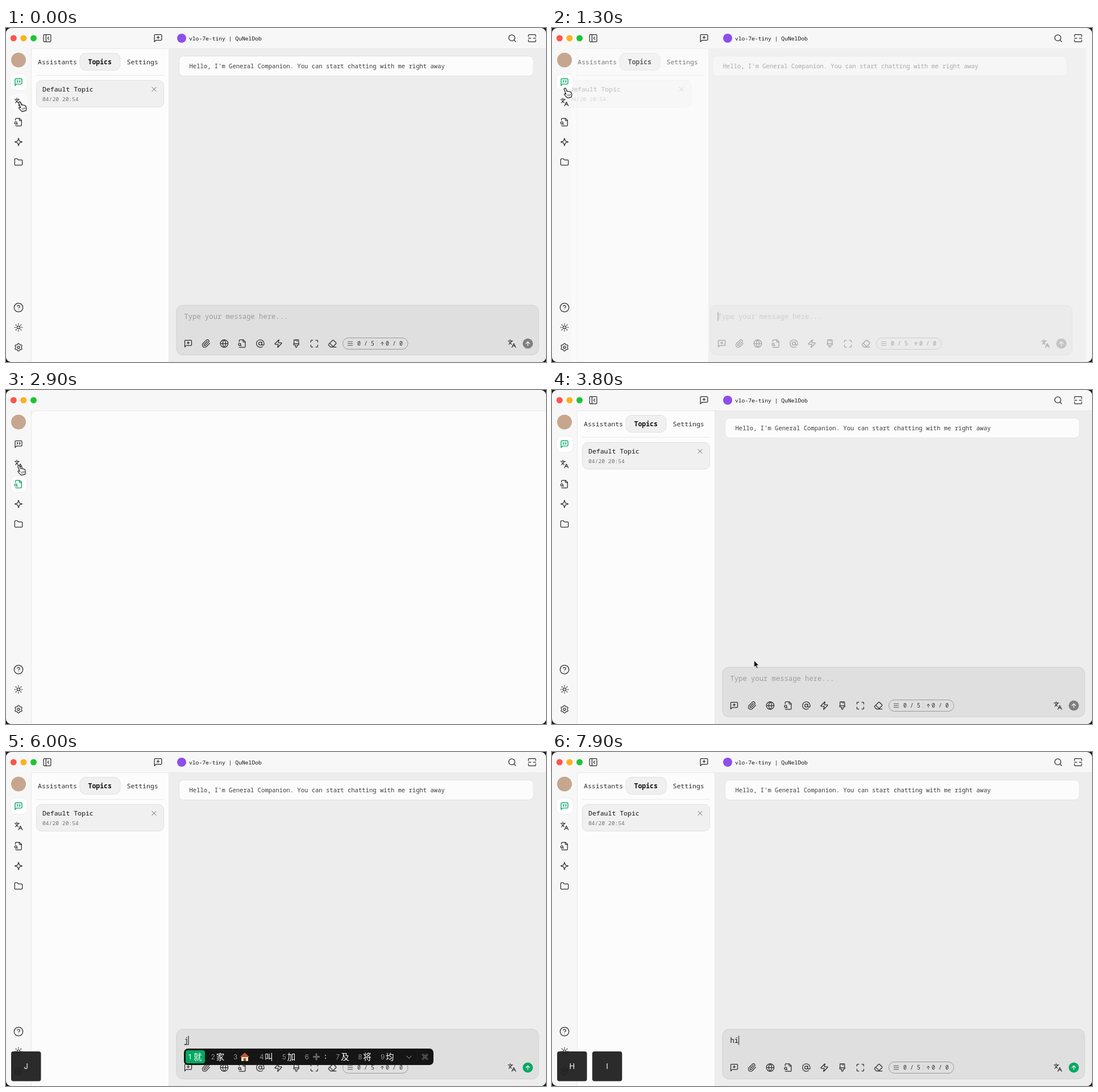
An HTML page that plays this animation: 950 by 589 pixels, repeating every 8000 ms.

```html
<!DOCTYPE html>
<html lang="en">
<head>
<meta charset="utf-8">
<title>Chat and translation demo</title>
<style>
html, body { margin: 0; width: 100%; height: 100%; overflow: hidden; background: #1d1b18; }
svg { display: block; width: 100vw; height: 100vh; }
text { font-family: "Noto Sans Mono", "DejaVu Sans Mono", monospace; white-space: pre; }
.ui { font-family: Inter, "Noto Sans CJK SC", "Noto Sans CJK", sans-serif; }
.icon { fill: none; stroke-linecap: round; stroke-linejoin: round; }
.slide { animation: slide 8s infinite linear; }
.pointer { animation: point 8s infinite linear; }
.caret { animation: advance 8s infinite step-end; }
@keyframes slide {
  0%, 14.99%, 18.75%, 42.49%, 46.25%, 100% { transform: none; opacity: 1; }
  15%, 42.5% { transform: translateX(-30px); opacity: 0; animation-timing-function: cubic-bezier(.1, .4, .5, 1); }
}
@keyframes point {
  0%, 7.5% { transform: translate(24px, 131px); }
  8.75% { transform: translate(24px, 115px); }
  12.5%, 14.5% { transform: translate(23px, 102px); }
  16.25% { transform: translate(23px, 107px); }
  20% { transform: translate(23px, 112px); }
  23%, 26% { transform: translate(23px, 130px); }
  29.5%, 33% { transform: translate(22.5px, 165px); }
  40%, 41.5% { transform: translate(22.5px, 98px); }
  42.5% { transform: translate(60px, 140px); animation-timing-function: ease-out; }
  47.5%, 48.5% { transform: translate(355.5px, 477px); }
  52.5% { transform: translate(358px, 505px); }
  62.5%, 100% { transform: translate(362px, 511px); }
}
@keyframes advance {
  0%, 78.75% { transform: none; }
  70%, 92.5% { transform: translateX(7px); }
  95%, 100% { transform: translateX(14.5px); }
}
</style>
</head>
<body>
<script>
const LOOP = 8000;

// Time windows in ms during which each part is visible.
const windows = {
  chat: [[0, 100], [1200, 2000], [3400, LOOP]],
  translate: [[100, 1200], [2000, 2500]],
  files: [[2500, 3400]],
  hover: [[0, 100]],
  hand: [[0, 3400]],
  arrow: [[3400, 4200]],
  beam: [[4200, 5500]],
  click: [[1100, 1200], [1900, 2000], [2400, 2500], [3300, 3400]],
  empty: [[0, 5600], [6300, 7400]],
  filled: [[5600, 6300], [7400, LOOP]],
  ime: [[5600, 6300]],
  textH: [[7400, 7600]],
  textHi: [[7600, LOOP]],
  keyJ: [[5500, 6700]],
  keyH: [[7100, LOOP]],
  keyI: [[7500, LOOP]],
  blink: [[1200, 1700], [3400, 3700], [4200, 4700], [5200, 6800], [7300, LOOP]]
};

function windowCss([name, spans]) {
  const stops = new Map([[0, 0]]);
  for (const [from, to] of spans) {
    stops.set(from, 1);
    if (to < LOOP) stops.set(to, 0);
  }
  const frames = [...stops].map(([ms, on]) => `${ms / LOOP * 100}% { opacity: ${on}; }`);
  return `@keyframes ${name} { ${frames.join(" ")} 100% { opacity: ${[...stops.values()].pop()}; } }
    .${name} { animation: ${name} ${LOOP}ms infinite step-end; }`;
}
document.head.appendChild(document.createElement("style")).textContent =
  Object.entries(windows).map(windowCss).join("\n");

const disc = (x, y, r) => `M${x - r} ${y}a${r} ${r} 0 1 0 ${2 * r} 0a${r} ${r} 0 1 0 ${-2 * r} 0`;
const gear = () => "M" + Array.from({ length: 72 }, (_, i) => {
  const a = i * Math.PI / 36, r = 8.8 - 1.3 * Math.cos(6 * a);
  return `${(12 + r * Math.cos(a)).toFixed(2)} ${(12 + r * Math.sin(a)).toFixed(2)}`;
}).join("L") + "z" + disc(12, 12, 3);

const bubble = "M21 15a2 2 0 0 1-2 2H7l-4 4V5a2 2 0 0 1 2-2h14a2 2 0 0 1 2 2z";
const icons = {
  quote: bubble + "M8 12a2 2 0 0 0 2-2V8H8M14 12a2 2 0 0 0 2-2V8h-2",
  add: bubble + "M12 7v6M9 10h6",
  languages: "m5 8 6 6M4 14l6-6 2-3M2 5h12M7 2h1M22 22l-5-10-5 10M14 18h6",
  fileSearch: "M14 2v4a2 2 0 0 0 2 2h4M4.3 21a2 2 0 0 0 1.7 1H18a2 2 0 0 0 2-2V7l-5-5H6a2 2 0 0 0-2 2v3M9 18l-1.5-1.5" + disc(5, 14, 3),
  sparkle: "M12 2l2 6.5A2 2 0 0 0 15.5 10L22 12l-6.5 2A2 2 0 0 0 14 15.5L12 22l-2-6.5A2 2 0 0 0 8.5 14L2 12l6.5-2A2 2 0 0 0 10 8.5z",
  folder: "M20 20a2 2 0 0 0 2-2V8a2 2 0 0 0-2-2h-7.9a2 2 0 0 1-1.7-.9L9.6 3.9A2 2 0 0 0 7.9 3H4a2 2 0 0 0-2 2v13a2 2 0 0 0 2 2z",
  help: disc(12, 12, 10) + "M9.1 9a3 3 0 0 1 5.8 1c0 2-3 3-3 3M12 17h.01",
  sun: disc(12, 12, 4) + "M12 2v2M12 20v2M4.9 4.9l1.4 1.4M17.7 17.7l1.4 1.4M2 12h2M20 12h2M6.3 17.7l-1.4 1.4M19.1 4.9l-1.4 1.4",
  gear: gear(),
  panel: "M5 3h14a2 2 0 0 1 2 2v14a2 2 0 0 1-2 2H5a2 2 0 0 1-2-2V5a2 2 0 0 1 2-2zM9 3v18M16 15l-3-3 3-3",
  search: disc(11, 11, 8) + "M21 21l-4.3-4.3",
  wide: "M3 8V5a2 2 0 0 1 2-2h14a2 2 0 0 1 2 2v3M3 16v3a2 2 0 0 0 2 2h14a2 2 0 0 0 2-2v-3M3 12h6M15 12h6",
  history: "M20.5 15A9 9 0 1 1 18 5.3L21 8M21 3v5h-5M12 7v5l4 2",
  clip: "m21.4 11-9.2 9.2a6 6 0 0 1-8.5-8.5l8.6-8.5A4 4 0 1 1 18 8.8l-8.6 8.6a2 2 0 0 1-2.8-2.8l8.5-8.5",
  globe: disc(12, 12, 10) + "M12 2a14.5 14.5 0 0 0 0 20 14.5 14.5 0 0 0 0-20M2 12h20",
  at: disc(12, 12, 4) + "M16 8v5a3 3 0 0 0 6 0v-1a10 10 0 1 0-4 8",
  zap: "M4 14a1 1 0 0 1-.8-1.6l9.9-10.2a.5.5 0 0 1 .9.4l-2 6A1 1 0 0 0 13 10h7a1 1 0 0 1 .8 1.6l-9.9 10.2a.5.5 0 0 1-.9-.4l2-6A1 1 0 0 0 11 14z",
  brush: "M10 2v2M14 2v4M17 2a1 1 0 0 1 1 1v9H6V3a1 1 0 0 1 1-1zM6 12a1 1 0 0 0-1 1v1a2 2 0 0 0 2 2h2a1 1 0 0 1 1 1v3a2 2 0 1 0 4 0v-3a1 1 0 0 1 1-1h2a2 2 0 0 0 2-2v-1a1 1 0 0 0-1-1",
  expand: "M8 3H5a2 2 0 0 0-2 2v3M21 8V5a2 2 0 0 0-2-2h-3M3 16v3a2 2 0 0 0 2 2h3M16 21h3a2 2 0 0 0 2-2v-3",
  eraser: "m7 21-4.3-4.3c-1-1-1-2.5 0-3.4l9.6-9.6c1-1 2.5-1 3.4 0l5.6 5.6c1 1 1 2.5 0 3.4L13 21M22 21H7M5 11l9 9",
  sliders: "M20 7H10M14 17H4" + disc(17, 17, 3) + disc(7, 7, 3),
  mouse: "M5 9a7 7 0 0 1 14 0v6a7 7 0 0 1-14 0zM12 6v4",
  send: "M3 3l19 9-19 9 3-9zM6 12h9",
  copy: "M10 8h10a2 2 0 0 1 2 2v10a2 2 0 0 1-2 2H10a2 2 0 0 1-2-2V10a2 2 0 0 1 2-2zM4 16a2 2 0 0 1-2-2V4a2 2 0 0 1 2-2h10a2 2 0 0 1 2 2",
  down: "m3 8 9 9 9-9",
  command: "M15 6v12a3 3 0 1 0 3-3H6a3 3 0 1 0 3 3V6a3 3 0 1 0-3 3h12a3 3 0 1 0-3-3",
  close: "M19 5 5 19M5 5l14 14",
  up: "m5 12 7-7 7 7M12 20V5",
  menu: "M3 5h18M3 12h18M3 19h18"
};

const INK = "#2b2b2b", GREEN = "#05a862";

const icon = (name, x, y, size = 16, color = INK, weight = 1.25) =>
  `<path class="icon" d="${icons[name]}" stroke="${color}" stroke-width="${weight * 24 / size}"
    transform="translate(${x - size / 2} ${y - size / 2}) scale(${size / 24})"/>`;
const box = (x, y, x2, y2, r, fill, stroke = "none") =>
  `<rect x="${x}" y="${y}" width="${x2 - x}" height="${y2 - y}" rx="${r}" fill="${fill}" stroke="${stroke}"/>`;
const label = (s, x, y, size, fill = INK, extra = "") =>
  `<text x="${x}" y="${y}" font-size="${size}" fill="${fill}" ${extra}>${s}</text>`;
const group = (cls, ...parts) => `<g class="${cls}">${parts.join("")}</g>`;
const dot = (x, y, r, fill) => `<circle cx="${x}" cy="${y}" r="${r}" fill="${fill}"/>`;
const line = (d, stroke, width = 1) => `<path d="${d}" fill="none" stroke="${stroke}" stroke-width="${width}"/>`;
const BOLD = 'font-weight="600"', MEDIUM = 'font-weight="500"';

const active = (cls, name, y) =>
  group(cls, box(8, y - 14.5, 37, y + 14.5, 9, "#fff", "#ececec"), icon(name, 22, y, 16, GREEN, 1.4));

const sidebar = [
  dot(22, 56.5, 13, "#c6a68e"),
  group("hover", box(8, 116, 37, 145, 9, "#fbfafc")),
  ...[["quote", 95.5], ["languages", 130.5], ["fileSearch", 166], ["sparkle", 201], ["folder", 236.5],
    ["sun", 528], ["gear", 563]].map(([name, y]) => icon(name, 22, y)),
  icon("help", 22, 493, 18.5),
  active("chat", "quote", 95.5),
  active("translate", "languages", 130.5),
  active("files", "fileSearch", 166)
].join("");

const lights = ["#ff544d", "#ffb01f", "#1fc436"].map((c, i) => dot(13.3 + i * 17.6, 18, 5.5, c)).join("");

const chatHeader = group("chat",
  icon("panel", 72.5, 18, 17), icon("add", 267.5, 18, 17),
  dot(309, 18, 8, "#8d4fe8"),
  label("vlo-7e-tiny | QuNelDob", 322, 21.5, 9.7, "#111", MEDIUM),
  icon("search", 890.5, 18), icon("wide", 925.5, 18, 17));

const sendButton = (cls, fill) => group(cls, dot(918, 556.5, 9, fill), icon("up", 918, 556.5, 11, "#f2f2f2", 1.3));

const composer = [
  box(300, 489, 937, 576.5, 11, "#dfdfdf", "#cfcfcf"),
  group("empty", label("Type your message here...", 313.5, 513, 12.2, "#9c9c9c")),
  group("ime", label("j", 313.5, 513, 12.2, "#111"), line("M313.5 516h7", "#222")),
  group("textH", label("h", 313.5, 513, 12.2, "#111")),
  group("textHi", label("hi", 313.5, 513, 12.2, "#111")),
  group("blink", group("caret", line("M314 500.5v16", "#111", 1.1))),
  ...["add", "clip", "globe", "fileSearch", "at", "zap", "brush", "expand", "eraser"]
    .map((name, i) => icon(name, 320.5 + i * 31.7, 556.5)),
  box(592.5, 546.5, 707, 566.5, 10, "none", "#9a9a9a"),
  icon("menu", 605.5, 556.5, 11, "#555", 1), label("0 / 5", 618, 560, 10, "#333"),
  line("M653 551v11", "#cfcfcf"),
  icon("up", 662, 556.5, 9, "#444", 1), label("0 / 0", 668, 560, 10, "#333"),
  icon("languages", 890, 556.5),
  sendButton("empty", "#7e7e7e"), sendButton("filled", GREEN)
];

const chatPage = group("chat", group("slide",
  box(45, 36.5, 286.5, 600, 0, "#fcfcfc"),
  box(286.5, 36.5, 950, 600, 0, "#ededed"),
  line("M45 36.5H950M286.5 36.5V589", "#e8e8e8"),
  box(130, 44.5, 201, 74.5, 10, "#f0f0f0", "#e1e1e1"),
  label("Assistants", 56, 63.5, 11.5), label("Topics", 144.5, 63.5, 11.5, "#111", BOLD), label("Settings", 212.5, 63.5, 11.5),
  line("M53 83.5H278", "#e9e9e9"),
  '<g clip-path="url(#panel)">' + group("slide", group("slide",
    box(53.5, 92.5, 277.5, 139.5, 9, "#f0f0f0", "#e0e0e0"),
    label("Default Topic", 64, 112, 11.5, "#111", MEDIUM),
    label("04/20 20:54", 64, 129, 9.7, "#777"),
    icon("close", 260.5, 108, 12, "#666", 1))) + "</g>",
  group("slide",
    box(304.5, 49.5, 928, 84.5, 8, "#fcfcfc", "#e3e3e3"),
    label("Hello, I'm General Companion. You can start chatting with me right away", 322.5, 71, 10.55, "#3c3c3c"),
    ...composer)));

const translatePage = group("translate",
  label("Translation", 62, 22, 12.27, "#111", BOLD), icon("history", 166, 18, 15),
  '<path d="M44.5 600V45a8.500 8.500 0 0 1 8.500-8.500H960V600z" fill="#fcfcfc" stroke="#e9e9e9"/>',
  box(60.5, 54.5, 485, 571.5, 8, "#fdfdfd", "#ececec"),
  box(69.5, 63.5, 227.5, 91, 9, "#f0f0f0", "#c9c9c9"),
  label("Any language", 80, 81.5, 12.27, "#a6a6a6"), icon("down", 212.5, 77, 12, "#aaa", 1),
  icon("sliders", 253, 77, 15), icon("mouse", 285.5, 77, 15),
  box(361.5, 63.5, 475.5, 91, 9, "#f0f0f0", "#c9c9c9"),
  icon("send", 381, 77, 14, "#aaa", 1.1), label("Translate", 395, 81.5, 12.27, "#aaa"),
  box(60.5, 100, 482.5, 566.5, 9, "#dedede"),
  label("Enter text to translate", 74.5, 120, 14.05, "#9b9b9b"),
  box(498.5, 53.5, 937, 572, 8, "#f1f1f1"),
  box(507.5, 62.5, 665, 90, 9, "#fff", "#cfcfcf"),
  label("English", 517, 81, 12.27, "#1c1c1c"), icon("down", 650.5, 76.5, 12, "#888", 1),
  box(900.5, 62.5, 928, 90, 8, "#dedede", "#d0d0d0"), icon("copy", 914.5, 76.5, 15, "#aaa", 1.2),
  label("Translation", 513, 118, 12.27, "#111", MEDIUM));

const filesPage = group("files",
  '<path d="M44.5 600V45a8.500 8.500 0 0 1 8.500-8.500H960V600z" fill="#fcfcfc" stroke="#e9e9e9"/>');

const candidates = [..."就家\u0020叫加\u0020及将均"].map((glyph, i) => {
  const x = 321 + i * 39.8 + (i > 2 ? 5.5 : 0) + (i > 5 ? 15 : 0) - (i > 6 ? 0.8 : 0);
  return label(i + 1, i > 2 ? x : x - .3 * i, 542, 12, i ? "#8d8d8d" : "#fff", 'class="ui"') +
    label(glyph, x + 9, 542.5, 14.5, "#fff", 'class="ui"');
}).join("");

const ime = group("ime",
  box(313, 523, 752, 552, 7, "#151515"), box(316, 526, 350, 549, 4, GREEN), candidates,
  '<path d="M414 537h12v8h-12z" fill="#f1dfb8"/><path d="M411.500 538l8.500-8 8.500 8z" fill="#c4513d"/><path d="M418 540h4v5h-4z" fill="#80512f"/>',
  line("M540 537.500h12M546 531.500v12", "#666", 3), dot(562, 535, 1.2, "#999"), dot(562, 540, 1.2, "#999"),
  icon("down", 709, 538, 11, "#aaa", 1), line("M723.500 531v13", "#222"), icon("command", 737, 537.5, 13, "#777", 1));

const key = (cls, letter, x) => group(cls,
  box(x, 528, x + 52.5, 580.5, 4, "#202020f2"),
  label(letter, x + 26.3, 559, 13, "#fff", 'class="ui" text-anchor="middle"'));

const hand = "M-1.800.8a1.700 1.700 0 0 1 3.200-.8l2 5c1.400-.9 2.400-.6 2.800.3 1.300-.6 2.300-.2 2.700.7 1.400-.3 2 .4 2.300 1.400l.6 3.200-.6 4-6.500 1.800c-2.400-1.400-4.400-3.500-6-6.200-.3-1.200.8-1.900 2-1.200l1 .8z";
const pointer = group("pointer",
  group("click", `<circle r="27" fill="#ffffff55" stroke="#111" stroke-width="1.500"/>`),
  group("hand", `<path d="${hand}" fill="#fff" stroke="#111" stroke-width="1.200" stroke-linejoin="round"/>`,
    line("M4.500 10l.8 3.500M6.800 9.600l.8 3.300M9 9l.6 3", "#111", .8)),
  group("arrow", '<path d="M0 0v12l2.700-2.500 2 4.400 2-.9-2-4.300h3.700z" fill="#000" stroke="#fff" stroke-width=".8"/>'),
  group("beam", line("M-2.500-8Q0-8 0-6V6Q0 8-2.500 8M2.500-8Q0-8 0-6M0 6Q0 8 2.500 8", "#111", 1.1)));

document.body.insertAdjacentHTML("beforeend", `
  <svg viewBox="0 0 950 589" preserveAspectRatio="none">
    <defs>
      <clipPath id="window"><rect width="950" height="589" rx="9"/></clipPath>
      <clipPath id="panel"><rect x="45" y="84" width="241" height="505"/></clipPath>
    </defs>
    <g clip-path="url(#window)">
      ${box(0, 0, 950, 589, 0, "#f7f7f7")}
      ${line("M44.5 36V589", "#eaeaea")}
      ${lights}${chatHeader}${chatPage}${translatePage}${filesPage}${sidebar}
      ${ime}${key("keyJ", "J", 9)}${key("keyH", "H", 9)}${key("keyI", "I", 70.8)}
      ${pointer}
    </g>
  </svg>`);
</script>
</body>
</html>
```
